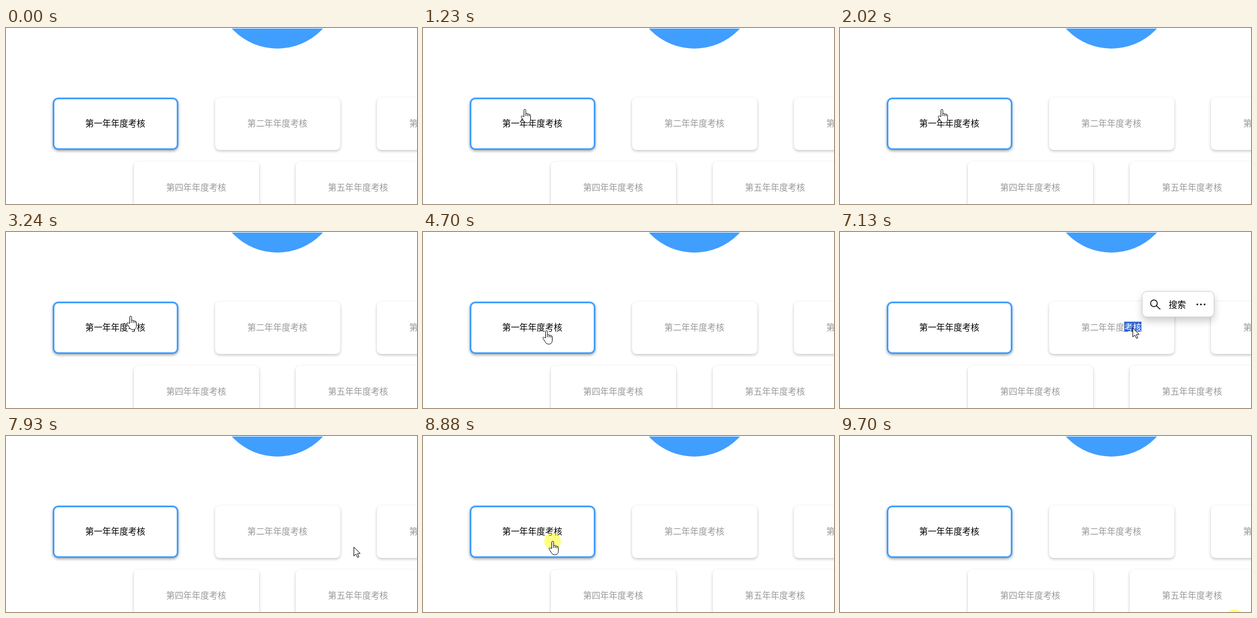
These frames come from a looping animation (739x316 px, 9.76 s). An HTML page:

```html
<!DOCTYPE html>
<html lang="zh-CN">
<head>
<meta charset="utf-8">
<style>
  html, body { margin: 0; width: 100%; height: 100%; overflow: hidden; background: #fff; }
  #stage { position: relative; width: 739px; height: 316px; overflow: hidden;
    font: 15.45px "Noto Sans CJK SC", "Noto Sans CJK", sans-serif; }
  #stage > * { position: absolute; box-sizing: border-box; }
  #disc { left: 377px; top: -185px; width: 222px; height: 222px; border-radius: 50%;
    background: #409eff; clip-path: inset(186px 0 0 0); }
  .card { width: 225px; height: 94px; padding: 0 1px 4px 0; border-radius: 8px;
    background: #fff; color: #999; box-shadow: 0 2px 5px rgba(0, 0, 0, .24);
    display: flex; align-items: center; justify-content: center; white-space: nowrap; }
  .card.active { width: 226px; border: 3px solid #409eff; border-radius: 10px; color: #000;
    box-shadow: 0 2px 5px rgba(0, 0, 0, .36); }
  .selected b { background: #3367d1; color: #fff; }
  b { font-weight: normal; display: inline-block; height: 18px; line-height: 18px; }
  #popup { left: 543px; top: 106px; width: 130px; height: 47px; border: 1px solid #ccc;
    border-radius: 9px; background: #fff; box-shadow: 0 7px 14px rgba(0, 0, 0, .2); }
  #popup span { position: absolute; left: 47px; top: 11px; line-height: 22px; }
  svg { left: 0; top: 0; }
</style>
</head>
<body>
<div id="stage">
  <div id="disc"></div>
  <div id="popup">
    <svg width="128" height="45" fill="none" stroke="#000" stroke-width="1.5">
      <circle cx="20.5" cy="21" r="6"/>
      <path d="M25 25.5L32 32"/>
      <path d="M98.5 23h.01M105 23h.01M111.5 23h.01" stroke-width="3.2" stroke-linecap="round"/>
    </svg>
    <span>搜索</span>
  </div>
  <svg width="739" height="316">
    <g id="pointer" stroke="#000" fill="#fff" stroke-linejoin="round">
      <circle id="press" r="15" fill="#ff0" fill-opacity=".5" stroke="none"/>
      <path id="arrow" d="M.5.5V16.5L4.2 13 7 19 9.5 18 6.9 12H12Z"/>
      <path id="hand" d="M-1.5 13V1.7a1.7 1.7 0 0 1 3.4 0V8c.4-1 2.9-.9 3.1.6.4-.8 2.7-.6 2.9.9.4-.7 2.5-.3 2.5 1.4V17c0 5-2.3 7.3-6 7.3-3.8 0-5.2-1.6-6.7-4.1L-6 14.5c-1.3-2 .8-3.5 2.3-2.1ZM1.9 8v4M5 8.6v3.6M7.9 9.5v3"/>
      <path id="forbidden" d="M-7 0a7 7 0 1 1 14 0a7 7 0 1 1-14 0M-5-5L5 5" fill="none" stroke-width="2"/>
    </g>
  </svg>
</div>
<script>
const $ = id => document.getElementById(id);
const LOOP = 9760, STEP = 64, CLICK = 70;
const SELECT = 6840, DESELECT = 7800;

const cards = [...'一二三四五'].map((numeral, i) => {
  const row = Math.floor(i / 3), col = i % 3;
  const left = Math.round(84 + 291.5 * col + 145.7 * row), top = 125 + 115 * row;
  const card = document.createElement('div');
  card.className = i ? 'card' : 'card active';
  card.style.cssText = `left:${left}px;top:${top}px`;
  card.innerHTML = `第${numeral}年年度<b>考核</b>`;
  $('stage').insertBefore(card, $('popup'));
  return { card, left, top };
});

// Each stop: where the pointer goes, when it leaves and arrives, and when it clicks there
const stop = (x, y, leave, arrive, ...clicks) => ({ x, y, leave, arrive, clicks });
const stops = [
  stop(493, 293, 0, 0),
  stop(266, 176, 330, 780),
  stop(183, 146, 1090, 1220, 1570, 2360),
  stop(496, 185, 3240, 3460, 3980),
  stop(222, 177, 4510, 4638, 5030),
  stop(526, 172, 5340, 5980, 6510, SELECT),
  stop(625, 199, 7530, 7730, DESELECT),
  stop(233, 189, 8130, 8610, 8880),
  stop(709, 326, 8950, 9430, 9700)
];

const clamp = v => Math.max(0, Math.min(1, v));
const smooth = p => p * p * (3 - 2 * p);

function pointerAt(t) {
  const i = stops.findLastIndex(s => s.leave <= t);
  const to = stops[i], from = stops[Math.max(0, i - 1)];
  const elapsed = (Math.floor((t - to.leave) / STEP) + 1) * STEP;
  const p = smooth(clamp(elapsed / (to.arrive - to.leave + STEP)));
  return [from.x + (to.x - from.x) * p, from.y + (to.y - from.y) * p].map(Math.round);
}

function cursorAt(x, y, selected) {
  const i = cards.findIndex(c => x >= c.left && x < c.left + 226 && y >= c.top && y < c.top + 94);
  if (i === 0) return 'hand';
  return i > 0 && !selected ? 'forbidden' : 'arrow';
}

function draw(now) {
  const t = now % LOOP;
  const selected = t >= SELECT && t < DESELECT;
  const [x, y] = pointerAt(t);
  const cursor = cursorAt(x, y, selected);
  const pressed = stops.some(s => s.clicks.some(c => t >= c && t < c + CLICK));

  $('pointer').style.display = t < stops[1].leave ? 'none' : '';
  $('pointer').setAttribute('transform', `translate(${x} ${y})`);
  for (const id of ['arrow', 'hand', 'forbidden']) $(id).style.display = id === cursor ? '' : 'none';
  $('press').style.display = pressed ? '' : 'none';

  cards[1].card.classList.toggle('selected', selected);
  const rise = clamp((t - SELECT - CLICK) / 200);
  $('popup').style.opacity = rise * (1 - clamp((t - DESELECT) / 130));
  $('popup').style.transform = `translateY(${10 * (1 - rise) ** 2}px)`;
  requestAnimationFrame(draw);
}
requestAnimationFrame(draw);
</script>
</body>
</html>
```
